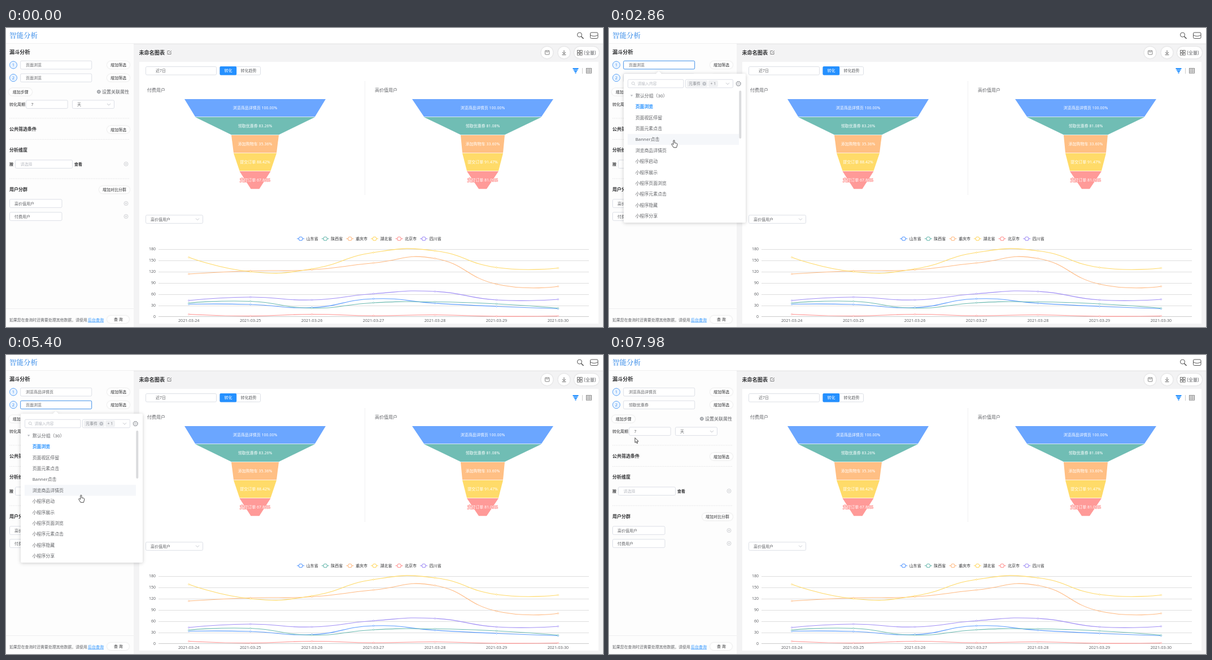
Recreate the animation shown at these times as an HTML page. Size 1057 by 530 pixels, loop 8 s.

```html
<!DOCTYPE html>
<html lang="zh-CN">
<head>
<meta charset="utf-8">
<title>漏斗分析</title>
<style>
html, body { margin: 0; width: 100%; height: 100%; overflow: hidden; background: #f3f3f4; }
svg { display: block; width: 100%; height: 100%; font-family: "Noto Sans", "Noto Sans CJK SC", sans-serif; }
text { white-space: pre; }
.soft { filter: drop-shadow(0 .6px 1.2px rgba(0, 0, 0, .16)); }
.pop { filter: drop-shadow(0 1px 3px rgba(0, 0, 0, .2)); }
</style>
</head>
<body>
<svg id="stage" viewBox="0 0 1057 530"></svg>
<script>
const LOOP = 8000, ROW = 19.38, BLUE = '#2490ff', EDGE = '#dcdfe6', INK = '#303133', GREY = '#606266';

// ---- drawing helpers; text is placed by its vertical centre ----
const text = (x, y, s, size = 7, fill = GREY, more = '') =>
  `<text x="${x}" y="${y + size * .38}" font-size="${size}" fill="${fill}" ${more}>${s}</text>`;
const bold = (x, y, s, size = 8) => text(x, y, s, size, INK, 'font-weight="700"');
const rect = (x, y, w, h, fill, more = '') =>
  `<rect x="${x}" y="${y}" width="${w}" height="${h}" fill="${fill}" ${more}/>`;
const line = (d, stroke, w = 1, more = '') =>
  `<path d="${d}" fill="none" stroke="${stroke}" stroke-width="${w}" ${more}/>`;
const ring = (x, y, r, stroke, w = .8, fill = 'none') =>
  `<circle cx="${x}" cy="${y}" r="${r}" fill="${fill}" stroke="${stroke}" stroke-width="${w}"/>`;
const box = (x, y, w, more = '') => rect(x, y, w, 14.6, '#fff', `rx="2" stroke="${EDGE}" ${more}`);
const pill = (x, y, w, s, tx) =>
  rect(x, y - 6.5, w, 13, '#fff', 'rx="6.5" class="soft"') + text(tx, y, s, 7, INK);
const chevron = (x, y) => line(`M${x - 3} ${y - 1.5}l3 3 3-3`, '#b4b8bf', .8);
const plus = (x, y) => ring(x, y, 3.5, '#b9bcc2', .7) + line(`M${x - 1.8} ${y}h3.6M${x} ${y - 1.8}v3.6`, '#b9bcc2', .6);
const gear = (x, y, r, c) => ring(x, y, r, c, 1.2) + ring(x, y, r * .4, c, .7) +
  `<circle cx="${x}" cy="${y}" r="${r + .8}" fill="none" stroke="${c}" stroke-width="1" stroke-dasharray="${(r + .8) * Math.PI / 8}"/>`;

function header() {
  return rect(0, 0, 1057, 27.5, '#fff', 'class="soft"') +
    text(6, 13, '智能分析', 12.5, '#69a8ee', 'font-weight="700" style="font-family:\'Noto Serif CJK SC\',\'Noto Serif\',\'Noto Sans CJK SC\',serif"') +
    ring(1015.5, 12, 4, '#555', 1) + line('M1018.5 15l4 4', '#555', 1.6) +
    rect(1034.5, 8, 13.5, 10.5, 'none', 'rx="2" stroke="#555"') + line('M1034.5 12.5q6.7 4 13.5 0', '#555', 1);
}

function sidebar() {
  let s = rect(0, 28, 226, 502, '#fdfdfd') + bold(6, 42.5, '漏斗分析', 9.2);
  [65.5, 88.3].forEach((y, i) => {
    s += ring(13, y, 6.5, '#5aa2f7', 1, '#eaf4ff') +
      text(13, y, i + 1, 7.5, '#3d8ff0', 'text-anchor="middle"') +
      box(25.7, y - 7.2, 126, `id="in${i}"`) + text(35, y, '', 7, GREY, `id="val${i}"`) +
      pill(179, y, 40, '增加筛选', 185);
  });
  s += pill(5, 113.3, 41, '增加步骤', 11.7) + gear(164.3, 113, 2.3, '#8f9399') +
    text(170, 113, '设置关联属性', 8) + text(6, 135.3, '转化周期', 7, INK) +
    box(35.7, 128, 73.5) + text(44.5, 135.3, '7') + box(117.5, 128, 74) + text(126, 135.3, '天') + chevron(182, 135.5) +
    bold(6, 179, '公共筛选条件') + pill(179, 180, 40, '增加筛选', 185) +
    bold(6, 216.3, '分析维度') + bold(6, 241, '按', 7) + box(16.5, 234, 101) +
    text(25.5, 241.3, '请选择', 7, '#b8bbc2') + bold(121, 241, '查看', 7) + plus(212.5, 241) +
    bold(6, 286, '用户分群') + pill(165, 286.7, 54, '增加对比分群', 171);
  [160, 197.5, 267].forEach(y => s += line(`M6 ${y}H218`, '#e9e9ea', 1, 'stroke-dasharray="2 1"'));
  ['高价值用户', '付费用户'].forEach((name, i) => {
    const y = 311 + i * 23;
    s += box(6.5, y - 7.3, 92.5) + text(15, y, name) + plus(212.5, y);
  });
  return s + line('M0 497.5H226', '#efeff0') +
    text(6, 517.5, '如果您在查询时还需要处理其他数据，请使用', 6.9) +
    text(145, 517.5, '后台查询', 7, BLUE, 'text-decoration="underline"') + pill(179, 516.5, 39, '查 询', 191);
}

function toolbar() {
  const dot = x => `<circle cx="${x}" cy="43.5" r="10.5" fill="#fff" class="soft"/>`;
  let s = bold(235.5, 43.3, '未命名图表', 9.1) +
    line('M290 40.5h-4v6h6v-4M288.500 44.500l4.500-4.500', '#777', .9) +
    dot(958) + rect(954.5, 40, 7.5, 7, 'none', 'rx=".8" stroke="#777" stroke-width=".9"') + line('M956.500 40v2.500h3.500V40', '#777', .8) +
    dot(988) + line('M988 39.500v6M985 43l3 3 3-3M984.500 47.500h7', '#555', .9) +
    rect(1006, 33, 44, 21, '#fff', 'rx="10.5" class="soft"') + text(1023.5, 43.5, '(全量)', 8);
  for (let i = 0; i < 4; i++)
    s += rect(1011.5 + i % 2 * 5, 39.5 + (i >> 1) * 5, 3.6, 3.6, 'none', 'stroke="#666" stroke-width=".9"');
  s += rect(236, 60, 813, 464, '#fff') + box(247.5, 68.5, 125) + text(265, 75.8, '近7日') +
    box(378.5, 68.5, 72) + rect(378.5, 68, 29.7, 15.5, BLUE, 'rx="2"') +
    text(386.5, 75.8, '转化', 7, '#fff') + text(415.5, 75.8, '转化趋势') +
    line('M1003.500 72h10M1004.800 74.500h7.400M1006.300 77h4.400M1007.500 79.500h2', BLUE, 1.8) +
    line('M1020.500 71v10', '#ccc') + rect(1027.5, 71.5, 9, 8.5, 'none', 'stroke="#777" stroke-width=".9"') +
    line('M1027.500 74.300h9M1027.500 77.200h9M1030.500 71.500v8.500M1033.500 71.500v8.500', '#777', .7);
  return s + line('M635.5 94V296', '#f0f0f1');
}

function funnel(cx, x, title, half, rates) {
  const names = ['浏览商品详情页', '领取优惠券', '添加购物车', '提交订单', '支付订单'];
  const fills = ['#6ba6ff', '#70bdb4', '#ffbf84', '#ffdb69', '#ff9a98'];
  return text(x, 109.5, title, 8) + names.map((name, i) => {
    const y = 126 + i * 32, a = half[i], b = half[i + 1];
    return `<path d="M${cx - a} ${y}H${cx + a}L${cx + b} ${y + 31.3}H${cx - b}z" fill="${fills[i]}"/>` +
      text(cx, y + 15.5, `${name} ${rates[i]}%`, 7, '#fff',
        `text-anchor="middle" stroke="${fills[i]}" stroke-width="1.6" paint-order="stroke"`);
  }).join('');
}

function chart() {
  const series = [
    ['山东省', '#5c9cff', [489.5, 490, 495.5, 480, 488, 493.5, 497.5]],
    ['陕西省', '#6cbab0', [487.5, 484.5, 496.5, 487, 485.5, 489, 496.5]],
    ['重庆市', '#ffb981', [436, 430.5, 428.5, 416.5, 408.5, 454, 458]],
    ['湖北省', '#ffd966', [406.5, 432, 427, 398, 395, 424.5, 425.5]],
    ['北京市', '#ff918f', [507.5, 510.5, 507.5, 510, 508.5, 511, 510.5]],
    ['四川省', '#a18ff5', [483, 477, 482, 471, 467, 482, 481]]];
  const px = i => 323.7 + i * 108.95;
  let s = box(247.5, 331.7, 101) + text(256, 339, '高价值用户') + chevron(339, 339);
  for (let i = 0; i < 7; i++) {
    const y = 392 + i * 20;
    s += line(`M270 ${Math.floor(y) + (i < 6 ? .5 : -.5)}H1032`, i < 6 ? '#dedede' : '#ccc') +
      text(265, y - .5, 180 - i * 30, 7, GREY, 'text-anchor="end"') +
      text(px(i), 518.7, `2021-03-${24 + i}`, 7.2, GREY, 'text-anchor="middle"');
  }
  series.forEach(([name, color, ys], k) => {
    const lx = 521.7 + k * 43.6;
    s += line(`M${lx - 6.5} 373.5h13`, color, 1.1) + ring(lx, 373.5, 3.3, color, 1.1, '#fff') + text(lx + 10, 373.3, name, 7, INK);
    const slope = i => i > 0 && i < 6 ? (ys[i + 1] - ys[i - 1]) / 4 : 0;
    const reach = i => i > 0 && i < 6 ? 54.5 : 0;
    let d = `M${px(0)} ${ys[0]}`;
    for (let i = 0; i < 6; i++)
      d += `C${px(i) + reach(i)} ${ys[i] + slope(i)} ${px(i + 1) - reach(i + 1)} ${ys[i + 1] - slope(i + 1)} ${px(i + 1)} ${ys[i + 1]}`;
    s += line(d, color, 1.1) + ys.map((y, i) => ring(px(i), y, 1.2, color, .7, '#fff')).join('');
  });
  return s;
}

const events = ['页面浏览', '页面视区停留', '页面元素点击', 'Banner点击', '浏览商品详情页', '小程序启动', '小程序展示',
  '小程序页面浏览', '小程序元素点击', '小程序隐藏', '小程序分享', '登录', '收藏', '添加购物车', '领取优惠券',
  '点击立即购买', '提交订单', '支付订单', '点击分享', '评价商品', '取消订单'];

function popup() {
  return `<g id="popup"><path d="M28 81H83l5-4.500 5 4.500H240a2 2 0 0 1 2 2V343a2 2 0 0 1-2 2H28a2 2 0 0 1-2-2V83a2 2 0 0 1 2-2z" fill="#fff" class="pop"/>` +
    box(33.5, 91.3, 98.5) + ring(42.7, 98, 2.4, '#b4b8bf', .7) + line('M44.500 100l1.700 1.700', '#b4b8bf', .8) +
    text(50.5, 98.7, '请输入内容', 6.8, '#b8bbc2') + box(135.5, 91.3, 84) +
    rect(138, 93, 36.5, 11.5, '#f0f1f3', 'rx="2"') + text(141, 98.7, '元事件', 7, '#85888e') +
    `<circle cx="168.8" cy="98.7" r="3.2" fill="#b9bcc2"/>` + line('M167.500 97.400l2.600 2.600M170.100 97.400l-2.600 2.600', '#fff', .7) +
    rect(176, 93, 17, 11.5, '#f0f1f3', 'rx="2"') + text(179.5, 98.7, '+ 1', 7, '#85888e') + chevron(210, 98.7) + gear(229.2, 98.7, 3.6, '#a5a8ad') +
    `<clipPath id="clip"><path d="M27 110H241V338H27z"/></clipPath><g clip-path="url(#clip)"><g id="list">` +
    rect(33, 0, 197, ROW, '#f5f7fa', 'id="hover"') + `<path d="M37.800 118.500h4.600l-2.300 3z" fill="#b9bcc2"/>` +
    text(47, 119.7, '默认分组（30）', 7.9) +
    events.map((e, i) => text(46.7, 139.3 + i * ROW, e, 7.9, GREY, 'class="item"')).join('') +
    `</g></g>` + rect(230.3, 111, 4, 85, '#dadbdd', 'rx="2" id="thumb"') + `</g>`;
}

const pointer = `<circle id="click" r="7" fill="#f7ec4f" opacity=".85"/><g id="cursor" fill="#fff" stroke="#333" stroke-width=".9" stroke-linejoin="round">
<path id="hand" d="M-1.200 7.500V.9a1.100 1.100 0 0 1 2.200 0V4.600l1.900.3 1.800.5c.9.3 1.200.8 1.100 1.800L5.200 10.200 4.400 12.800H-.8L-3 9.400-4.300 7.200c-.4-1 .9-1.600 1.600-.9z"/>
<path id="arrow" d="M0 0V8.600L2 6.900 3.400 10 4.800 9.400 3.500 6.400H6.200z"/></g>`;

stage.innerHTML = header() + sidebar() + toolbar() +
  funnel(441, 250, '付费用户', [125, 106, 42, 38, 27.5, 7.5], ['100.00', '83.26', '35.36', '88.42', '67.86']) +
  funnel(844, 653, '高价值用户', [125, 104, 39, 36, 28, 7], ['100.00', '81.08', '33.60', '91.47', '81.09']) +
  chart() + popup() + pointer;

// ---- motion ----
const $ = id => document.getElementById(id);
const set = (id, o) => { for (const k in o) $(id).setAttribute(k, o[k]); };
const items = [...document.querySelectorAll('.item')];
const inside = (t, a, b) => t >= a && t < b;

// Rows of [time, ...values], each move easing out.
function track(rows, t) {
  if (t <= rows[0][0]) return rows[0].slice(1);
  const i = rows.findIndex(r => r[0] > t);
  if (i < 0) return rows[rows.length - 1].slice(1);
  const a = rows[i - 1], b = rows[i], p = 1 - (1 - (t - a[0]) / (b[0] - a[0])) ** 2;
  return a.slice(1).map((v, k) => v + (b[k + 1] - v) * p);
}
const path = [[400, 1060, 533], [1180, 84, 67], [1210, 84, 67], [1270, 84, 60.7], [2280, 84, 60.7], [3070, 117.5, 209.5],
  [3100, 117.5, 209.5], [3160, 117.5, 215], [3670, 117.5, 215], [3840, 109, 211.5], [4400, 88, 89.3], [4830, 88, 89.3],
  [5280, 132.5, 245], [5310, 132.5, 245], [5400, 133, 248.5], [6010, 133, 248.5], [6500, 134, 253], [6840, 134, 253],
  [7250, 112, 261], [7650, 112, 261], [7970, 46, 146.7]];
const fade = [[1760, 0], [2090, 1], [3670, 1], [3880, 0], [4600, 0], [4900, 1], [7650, 1], [7860, 0]];
const scroll = [[5610, 0], [5780, 57], [6010, 57], [6220, 114], [6400, 114], [6640, 170.9]];
const clicks = [[1660, 1780], [3370, 3470], [4500, 4620], [7430, 7550]];

function field(i, value, hoverAt, openAt, doneAt, t) {
  $('val' + i).textContent = t < doneAt ? events[0] : value;
  set('in' + i, { stroke: inside(t, hoverAt, openAt) ? '#b6bac2' : inside(t, openAt, doneAt) ? '#3f8fe8' : EDGE });
}

function frame(now) {
  const t = now % LOOP, [x, y] = track(path, t), [alpha] = track(fade, t);
  const second = t > 4450, drop = second ? 23 : 0, [top] = second ? track(scroll, t) : [0];
  field(0, events[4], 1180, 1720, 3400, t);
  field(1, events[14], 4370, 4570, 7470, t);

  const inList = alpha > 0 && inside(y, 110 + drop, 338 + drop) && inside(x, 27, 241);
  const row = inside(t, 5700, 6840) ? 8 : Math.floor((y - drop + top - 129.6) / ROW);
  const chosen = second ? (t < 7470 ? 0 : 14) : (t < 3400 ? 0 : 4);
  set('popup', { opacity: alpha, transform: `translate(0 ${drop})`, display: alpha ? 'inline' : 'none' });
  set('list', { transform: `translate(0 ${-top})` });
  set('hover', { y: 129.6 + row * ROW, opacity: inList && row >= 0 ? 1 : 0 });
  set('thumb', { y: 111 + top * .3745 });
  items.forEach((el, i) => {
    el.setAttribute('fill', i === chosen ? BLUE : GREY);
    el.setAttribute('font-weight', i === chosen ? 700 : 400);
  });

  const onField = inside(x, 25, 152) && (inside(y, 58, 73) || inside(y, 81, 96));
  const hand = inList || onField;
  set('cursor', { transform: `translate(${x} ${y})`, display: t < 400 ? 'none' : 'inline' });
  set('hand', { display: hand ? 'inline' : 'none' });
  set('arrow', { display: hand ? 'none' : 'inline' });
  set('click', { cx: x - .7, cy: y, display: clicks.some(c => inside(t, ...c)) ? 'inline' : 'none' });
}

const start = performance.now();
function tick() {
  frame(performance.now() - start);
  requestAnimationFrame(tick);
}
tick();
</script>
</body>
</html>
```
